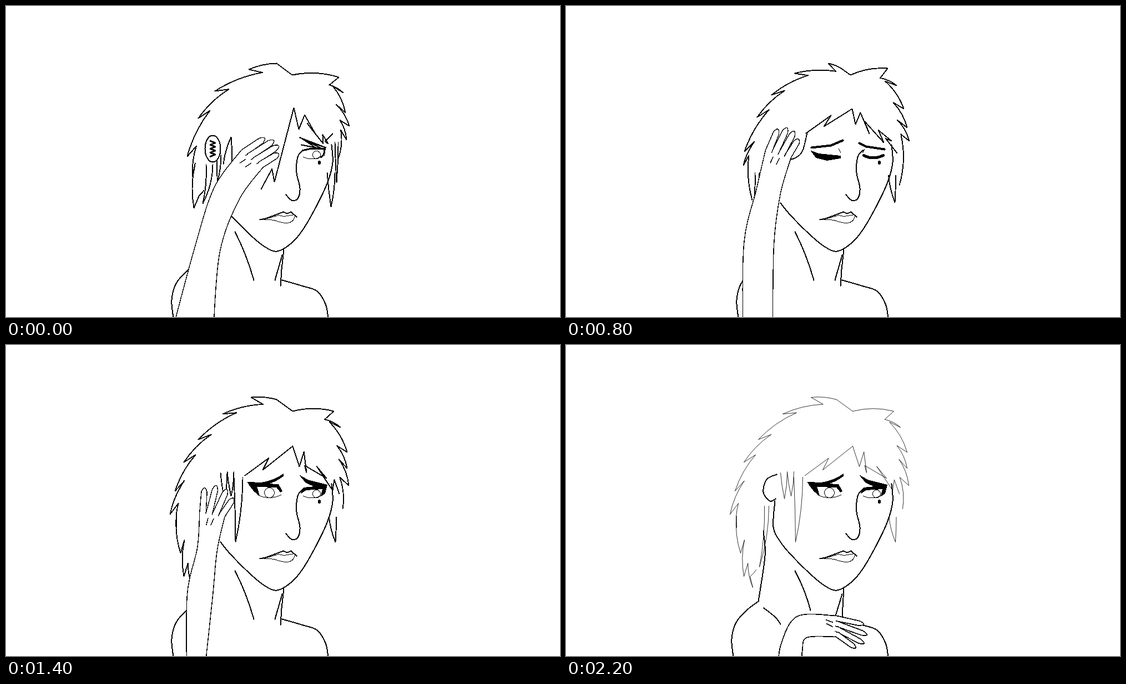
An HTML page for the animation above (2.4 s loop, 998 by 561 pixels).

```html
<!DOCTYPE html>
<html>
<head>
<meta charset="utf-8">
<style>
html, body { margin: 0; width: 100%; height: 100%; overflow: hidden; background: #fff; }
svg { display: block; width: 100%; height: 100%; fill: none; stroke: #000; stroke-linejoin: round; stroke-linecap: round; shape-rendering: crispEdges; }
</style>
</head>
<body>
<svg id="stage" viewBox="0 0 998 561"></svg>
<script>
const STEP = 200, DEG = Math.PI / 180;

// Geometry
const points = text => text.split(' ').map(s => s.split(',').map(Number));
const polar = ([x, y], angle, r) => [x + r * Math.cos(angle), y + r * Math.sin(angle)];
const heading = (a, b) => Math.atan2(b[1] - a[1], b[0] - a[0]);
const distance = (a, b) => Math.hypot(b[0] - a[0], b[1] - a[1]);
const mix = (a, b, t) => Array.isArray(a) ? a.map((v, i) => mix(v, b[i], t)) : a + (b - a) * t;

const line = (d, width, fill = 'none') => `<path d="${d}" stroke-width="${width}" fill="${fill}"/>`;
const mark = ([width, d]) => width ? line(d, width) : line(d, 1, '#000');

// Smooth curve through all points
function curve(p) {
  const at = i => p[Math.max(0, Math.min(p.length - 1, i))];
  const handle = (i, k) => at(i).map((v, j) => v + k * (at(i + 1)[j] - at(i - 1)[j]) / 6);
  return 'M' + p[0] + p.slice(1).map((q, i) => `C${handle(i, 1)} ${handle(i + 1, -1)} ${q}`).join('');
}

// Hair edge: bowed strokes to each tip, then a cut back towards the tip before, turned inwards
function tufts(p, turn, reach, bow) {
  let from = p[0], d = 'M' + from;
  for (let i = 1; i < p.length; i++) {
    const tip = p[i], before = p[i - 1];
    const control = polar(mix(from, tip, .5), heading(from, tip) + Math.PI / 2, bow * distance(from, tip));
    d += `Q${control} ${tip}`;
    from = polar(tip, heading(tip, before) + turn * DEG, Math.min(reach, .8 * distance(tip, before)));
    if (i < p.length - 1) d += 'L' + from;
  }
  return d;
}

const lock = ([x, y, tipX, tipY, w]) =>
  `M${x - w / 2},${y}Q${x - w / 3},${(y + tipY) / 2} ${tipX},${tipY}Q${x + w / 2},${(y + tipY) / 2} ${x + w / 2},${y}`;

// Hairstyles: tips along each edge, loose locks as [x, y, tip x, tip y, width]
const styles = {
  covered: {
    left: '487,103 437,114 376,153 346,202 326,271 336,308 338,364 356,332',
    right: '515,124 599,128 607,156 611,192 618,216 613,241 598,275',
    fringe: ['518,183 483,317 459,330', '518,183 527,222 558,232 571,248 580,248 588,230'],
    locks: [[585, 300, 585, 362, 14], [595, 245, 595, 318, 6], [366, 285, 354, 356, 12], [383, 268, 380, 318, 8], [399, 285, 405, 236, 16]],
  },
  pushed: {
    left: '487,104 435,115 376,160 350,201 332,281 338,308 346,356 360,325',
    right: '519,126 590,129 602,166 615,198 613,213 610,245 598,270',
    fringe: ['522,186 466,266', '522,186 528,213 552,230 570,250 578,260 590,285'],
    locks: [[593, 265, 592, 326, 9], [583, 310, 585, 362, 9], [398, 343, 383, 395, 26], [440, 295, 430, 330, 12]],
  },
  swept: {
    left: '495,112 472,103 411,121 370,160 344,200 321,262 319,287 335,350',
    right: '512,124 579,112 595,143 608,185 614,219 618,243 600,323',
    fringe: ['515,185 464,217 432,229', '515,185 521,213 546,230 572,246 586,243 596,265'],
    locks: [[587, 305, 592, 354, 13], [344, 300, 336, 370, 8]],
    curl: '434,228 426,260 415,272 400,276 388,264',
  },
  long: {
    left: '487,98 441,94 390,124 346,170 320,211 304,263 295,305 307,329 314,375 320,417 336,437 342,405',
    right: '516,119 590,119 602,148 614,193 614,222 617,253 606,295',
    fringe: ['516,182 462,225 430,235', '516,182 528,219 541,230 577,240 588,262 600,268'],
    locks: [[418, 238, 413, 355, 16], [404, 228, 405, 272, 12], [392, 230, 393, 277, 12], [588, 310, 593, 355, 13], [361, 290, 348, 400, 8]],
  },
};

function hairArt(name, width) {
  const { left, right, fringe, locks, curl } = styles[name];
  const crown = points(left), part = points(right);
  return [
    `M${part[0]}L${crown[0]}`,
    tufts(crown, 25, 25, .1),
    tufts(part, -42, 22, -.13),
    tufts(points(fringe[0]), -25, 24, 0),
    tufts(points(fringe[1]), 35, 28, 0),
    ...locks.map(lock),
    curl ? curve(points(curl)) : '',
  ].map(d => line(d, width)).join('');
}

// Face and body
const jaw = points('376,281 373,328 386,355 404,377 440,413 466,434 488,442 514,427 535,402 560,358 579,317 588,282 586,250');
const nose = points('534,260 525,272 523,300 529,328 525,347 514,350 504,340');
const rightShoulder = points('497,494 535,505 560,514 575,537 580,562');
const leftShoulder = points('346,462 325,478 306,500 298,530 301,562');
const napeAndCollar = ['355,335 358,380 346,462', '356,474 376,490 386,503'];
const lips = [
  [2, 'M457,385L467,383 499,371 506,374 513,371 523,380'],
  [1, 'M470,383L490,377 500,379 520,376M464,385Q480,384 492,389Q518,396 520,377'],
];
const neck = 'M412,407Q432,445 446,494M500,438L496,475 494,505M497,449L484,494';
const neckAboveHand = 'M412,407Q430,440 440,478M500,438L497,490M497,449L485,488';

// Eyes: [width, path], width 0 means filled
const iris = (x, y, r, width = 1) => [width, `M${x - r},${y}a${r},${r} 0 1,1 ${2 * r},0a${r},${r} 0 1,1 ${-2 * r},0`];
const lowerLid = [1, 'M535,272Q550,279 566,272'];
const rightEye = [iris(559, 268, 7), lowerLid];
const eyes = {
  scowl: [
    [2, 'M530,237L560,257 538,242 571,258 543,244 576,255 529,237M532,250L572,258'],
    [3, 'M534,260L548,257 574,257 572,268 567,272'], ...rightEye,
  ],
  worry: [
    [4, 'M476,247L487,243 499,235M471,253L489,253'], [2, 'M489,253L496,265'],
    iris(474, 266, 9), [1, 'M458,274Q476,281 494,270'],
    [4, 'M530,237L541,246 569,254M538,258L573,257'], [3, 'M574,257L571,266'], ...rightEye,
  ],
  shut: [
    [4, 'M442,255L477,251 498,242M528,247L540,253 573,258'],
    [0, 'M441,261L455,266 494,270 494,274 470,278 450,273Z'],
    [5, 'M536,269Q552,278 571,269'], [1, 'M491,257L494,264M537,258L534,264'],
  ],
  open: [
    [6, 'M440,256L470,250 495,240'], [5, 'M442,260L488,261M443,261L453,274'],
    iris(475, 269, 8, 2), [2, 'M454,275Q476,281 491,275M488,252L490,260'],
    [5, 'M528,243L538,249 555,253'], [3, 'M555,253L573,261M537,264L573,263 567,271'],
    iris(557, 269, 7, 2), [2, 'M535,273Q550,281 568,273'],
  ],
  sad: [
    [0, 'M435,247L460,248Q485,243 499,232L499,236Q484,247 470,250L490,251 497,263 494,265 487,256 451,255 456,271Q443,262 435,247Z'],
    iris(474, 266, 9), [1, 'M453,270Q474,280 495,270'],
    [0, 'M529,235L543,243 578,252 574,267 567,272 570,259 540,261 531,267 536,257 556,255 540,248Z'], ...rightEye,
  ],
};

function earArt([x, y, rx, ry]) {
  const zigzag = Array.from({ length: 9 }, (_, i) => [x + (i % 2 ? 4 : -4), y - 14 + i * 3.5]);
  return `<ellipse cx="${x}" cy="${y}" rx="${rx}" ry="${ry}" stroke-width="2" fill="#fff"/>` + line('M' + zigzag.join('L'), 3);
}

// spine: [x, y, width] from elbow to knuckles; fingers: [angle, length, spread]
const poses = [
  { hair: 'covered', eyes: 'scowl', jawFrom: 3, ear: [372, 257, 14, 24],
    spine: [[336, 590, 74], [362, 440, 46], [397, 338, 50], [443, 275, 50]], fingers: [-33, 56, 1] },
  { hair: 'pushed', eyes: 'worry', jawFrom: 2,
    spine: [[331, 590, 56], [348, 450, 54], [380, 340, 44], [438, 272, 34]], fingers: [-29, 39, 5] },
  { hair: 'swept', eyes: 'shut', jawFrom: 2, lean: 9,
    spine: [[345, 590, 54], [347, 430, 54], [364, 335, 44], [382, 266, 48]], fingers: [-63, 53, 3] },
  { hair: 'swept', eyes: 'open', jawFrom: 2, lean: 9,
    spine: [[326, 590, 36], [347, 440, 54], [366, 340, 40], [372, 270, 52]], fingers: [-75, 61, 9] },
  { hair: 'long', eyes: 'sad', jawFrom: 2,
    spine: [[341, 590, 32], [349, 450, 46], [362, 368, 36], [371, 305, 46]], fingers: [-71, 56, 10] },
  { hair: 'long', eyes: 'sad', jawFrom: 0, ear: [376, 259, 13, 20],
    spine: [[347, 590, 40], [350, 490, 34], [354, 428, 30], [356, 388, 38]], fingers: [-72, 43, 12] },
  { hair: 'long', eyes: 'sad', jawFrom: 0, lowered: true,
    spine: [[402, 590, 42], [406, 545, 40], [425, 508, 42], [487, 507, 38]], fingers: [24, 62, 8] },
];

function armArt(spine, [angle, length, spread], width) {
  const across = spine.map((p, i) =>
    heading(spine[Math.max(0, i - 1)], spine[Math.min(3, i + 1)]) + Math.PI / 2);
  const edge = side => spine.map(([x, y, w], i) => polar([x, y], across[i], side * w / 2));
  const left = curve(edge(-1)), right = curve(edge(1).reverse());
  const [x, y, w] = spine[3];
  let art = `<path d="${left + right.replace('M', 'L')}" fill="#fff" stroke="none"/>` + line(left + right, width);
  [.9, 1.05, 1, .75].forEach((scale, i) => {
    const place = i - 1.5, a = (angle + spread * place) * DEG;
    const base = polar([x, y], across[3], place * w / 4), end = polar(base, a, length * scale);
    const out = (p, r) => polar(p, a + Math.PI / 2, r);
    const bend = polar(base, a, length * scale * .75);
    art += line(`M${out(base, -w / 8)}L${out(bend, -w / 9)}Q${polar(end, a, 3)} ${out(bend, w / 9)}L${out(base, w / 8)}`, width, '#fff');
    if (i % 3) art += line(`M${polar(base, a, -8)}L${polar(base, a, -20)}`, width);
  });
  return art;
}

function drawing(at) {
  const from = poses[Math.floor(at)], to = poses[Math.ceil(at)], t = at % 1;
  const { lean = 0, lowered } = to;
  const body = [
    jaw.slice(to.jawFrom), nose, rightShoulder, leftShoulder.map(([x, y]) => [x + lean, y]),
    ...(lowered ? napeAndCollar.map(points) : []),
  ];
  return '<g transform="translate(.5 .5)">' + [
    hairArt(to.hair, lowered ? .8 : 1.9),
    ...body.map(p => line(curve(p), 2)),
    line(lowered ? neckAboveHand : neck, 2),
    ...lips.map(mark),
    to.ear ? earArt(to.ear) : '',
    lowered ? line(curve(points('379,233 361,242 355,265 367,281 377,277')), 2) : '',
    ...eyes[to.eyes].map(mark),
    '<ellipse cx="564" cy="282" rx="2.5" ry="3.5" fill="#000" stroke="none"/>',
    armArt(mix(from.spine, to.spine, t), mix(from.fingers, to.fingers, t), lowered ? 1.7 : 1.4),
  ].join('') + '</g>';
}

// Whole numbers are poses, halves lie between two
const steps = [0, .5, 1, 1.5, 2, 3, 3.5, 4, 4.5, 5, 5.5, 6].map(drawing);
const stage = document.getElementById('stage');
let shown = -1;
function tick() {
  const now = Math.floor(performance.now() / STEP) % steps.length;
  if (now !== shown) stage.innerHTML = steps[shown = now];
  requestAnimationFrame(tick);
}
tick();
</script>
</body>
</html>
```
